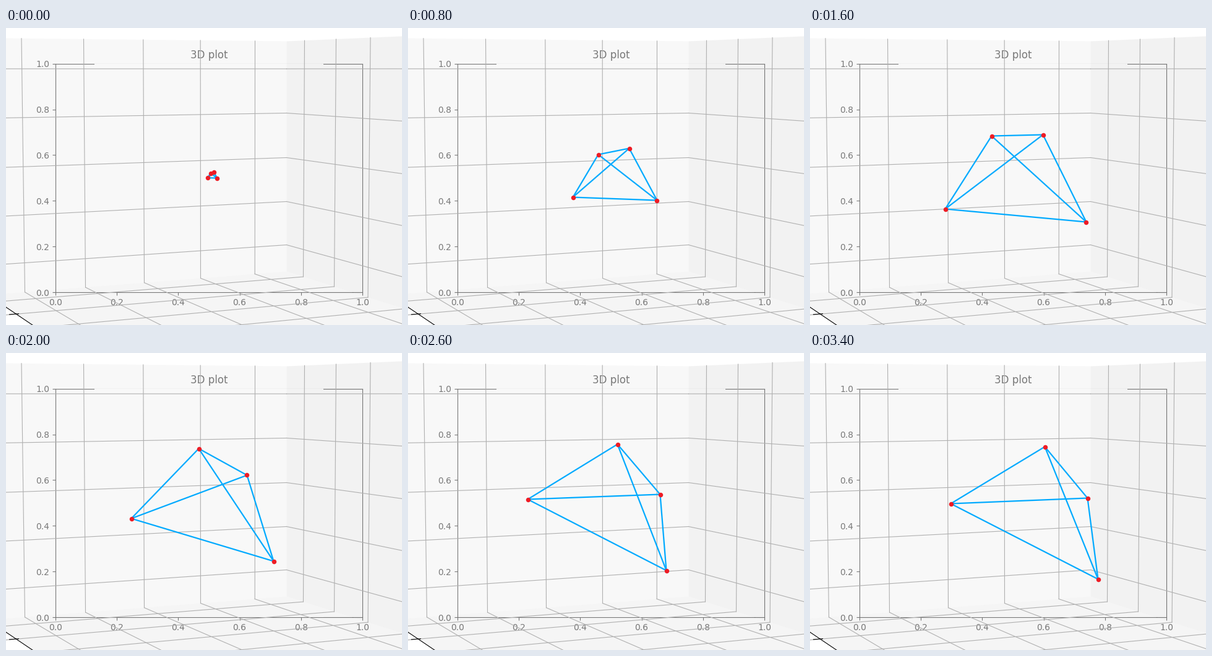
A matplotlib script that plays this animation: 640 by 480 pixels, repeating every 3.5 s.

```python
from itertools import combinations

import matplotlib.pyplot as plt
import numpy as np
from matplotlib.animation import FuncAnimation
from matplotlib.patches import Polygon, Rectangle

W, H = 640, 480
FRAMES, INTERVAL = 35, 100
GROW, SPIN = 15, 10          # frames per phase, the rest slides
STEP = 0.1                   # radians per spin frame

CORNER = 453                 # x of the edge between the two walls
TOP, BOTTOM = 21, 393        # its ends
VP_RIGHT = (4600, 66)        # vanishing points of the two floor directions
VP_LEFT = (-577, 66)

fig = plt.figure(figsize=(W / 100, H / 100), dpi=100, facecolor="white")

# Flat axes that show through the translucent walls.
flat = fig.add_subplot(111)
flat.set_title("3D plot")

stage = fig.add_axes([0, 0, 1, 1])
stage.set_xlim(-0.5, W - 0.5)
stage.set_ylim(H - 0.5, -0.5)
stage.axis("off")


def y_at(point, vp, x):
    """Height at x of the line from point towards the vanishing point."""
    return point[1] + (x - point[0]) * (vp[1] - point[1]) / (vp[0] - point[0])


def pane(points, shade):
    stage.add_patch(Polygon(points, facecolor=(shade,) * 3, alpha=0.5,
                            linewidth=0, zorder=2))


def line(p, q, color="#b0b0b0"):
    stage.plot(*zip(p, q), color=color, lw=0.8, zorder=3)


def line_to(point, vp, x):
    line(point, (x, y_at(point, vp, x)))


def draw_room():
    stage.add_patch(Rectangle((142.5, 57.5), 370, 369, facecolor="white",
                              linewidth=0, zorder=1))
    top, low = (CORNER, TOP), (CORNER, BOTTOM)
    far_l, far_r = -10, W + 10
    low_l = (far_l, y_at(low, VP_RIGHT, far_l))
    low_r = (far_r, y_at(low, VP_LEFT, far_r))
    front = (0, 451)

    pane([top, low, low_l, (far_l, y_at(top, VP_RIGHT, far_l))], 0.95)
    pane([top, low, low_r, (far_r, y_at(top, VP_LEFT, far_r))], 0.90)
    pane([low, low_r, (far_r, H + 10), (58, y_at(front, VP_LEFT, 58)),
          (far_l, y_at(front, VP_LEFT, far_l)), low_l], 0.925)

    for y in (65.5, 137, 209, 280, 350):
        line_to((CORNER, y), VP_RIGHT, far_l)
        line_to((CORNER, y), VP_LEFT, far_r)

    for x_top, x_low in ((24.5, 30), (125, 128), (221.3, 223),
                         (313.7, 314), (402, 401.7)):
        foot = (x_low, y_at(low, VP_RIGHT, x_low))
        line((x_top, y_at(top, VP_RIGHT, x_top)), foot)
        line_to(foot, VP_LEFT, far_r)

    for x_top, x_low in ((482, 480), (533, 530), (588.5, 584.5), (650, 643)):
        foot = (x_low, y_at(low, VP_LEFT, x_low))
        line((x_top, y_at(top, VP_LEFT, x_top)), foot)
        line_to(foot, VP_RIGHT, far_l)

    line((-3, 449), (46, 482), "black")
    line((5, 462.5), (20, 461.3), "black")


def power(t):
    return np.array([1, t, t * t])


def turn(t):
    return np.array([1, np.cos(STEP * t), np.sin(STEP * t)])


def fit(basis, times, poses):
    """Path through three poses, as a function of time."""
    poses = np.array(poses, float)
    coef = np.linalg.solve([basis(t) for t in times],
                           poses.reshape(len(times), -1))
    return lambda t: (basis(t) @ coef).reshape(poses.shape[1:])


# Corner positions of the solid at a few moments of each phase.
slide = fit(power, (1, 5, 9), [
    [(193, 236), (338, 147), (407, 228), (417, 351)],
    [(210, 240), (358, 149), (427, 231), (440, 358)],
    [(227, 243), (379, 151), (448, 234), (465, 365)]])
spin = fit(turn, (1, 5, 9), [
    [(218, 292), (293, 174), (376, 172), (446, 313)],
    [(202, 267), (311, 154), (389, 197), (432, 336)],
    slide(0)])
grow = fit(power, (0, 9, 15), [
    [(333, 237.7)] * 4,
    [(266, 273), (307, 204), (357, 194), (402, 278)],
    spin(0)])


def corners(i):
    if i < GROW:
        return grow(i + 1)
    if i < GROW + SPIN:
        return spin(i - GROW)
    return slide(i - GROW - SPIN)


draw_room()
pairs = list(combinations(range(4), 2))
edges = [stage.plot([], [], color="#00aaff", lw=1.6, zorder=4)[0]
         for _ in pairs]
dots, = stage.plot([], [], "o", color="#ee1c25", ms=5.4, mew=0, zorder=5)


def update(i):
    pts = corners(i)
    for edge, (a, b) in zip(edges, pairs):
        edge.set_data(pts[[a, b], 0], pts[[a, b], 1])
    dots.set_data(pts[:, 0], pts[:, 1])
    return [*edges, dots]


anim = FuncAnimation(fig, update, frames=FRAMES, interval=INTERVAL,
                     repeat=True, repeat_delay=0)
plt.show()
```
